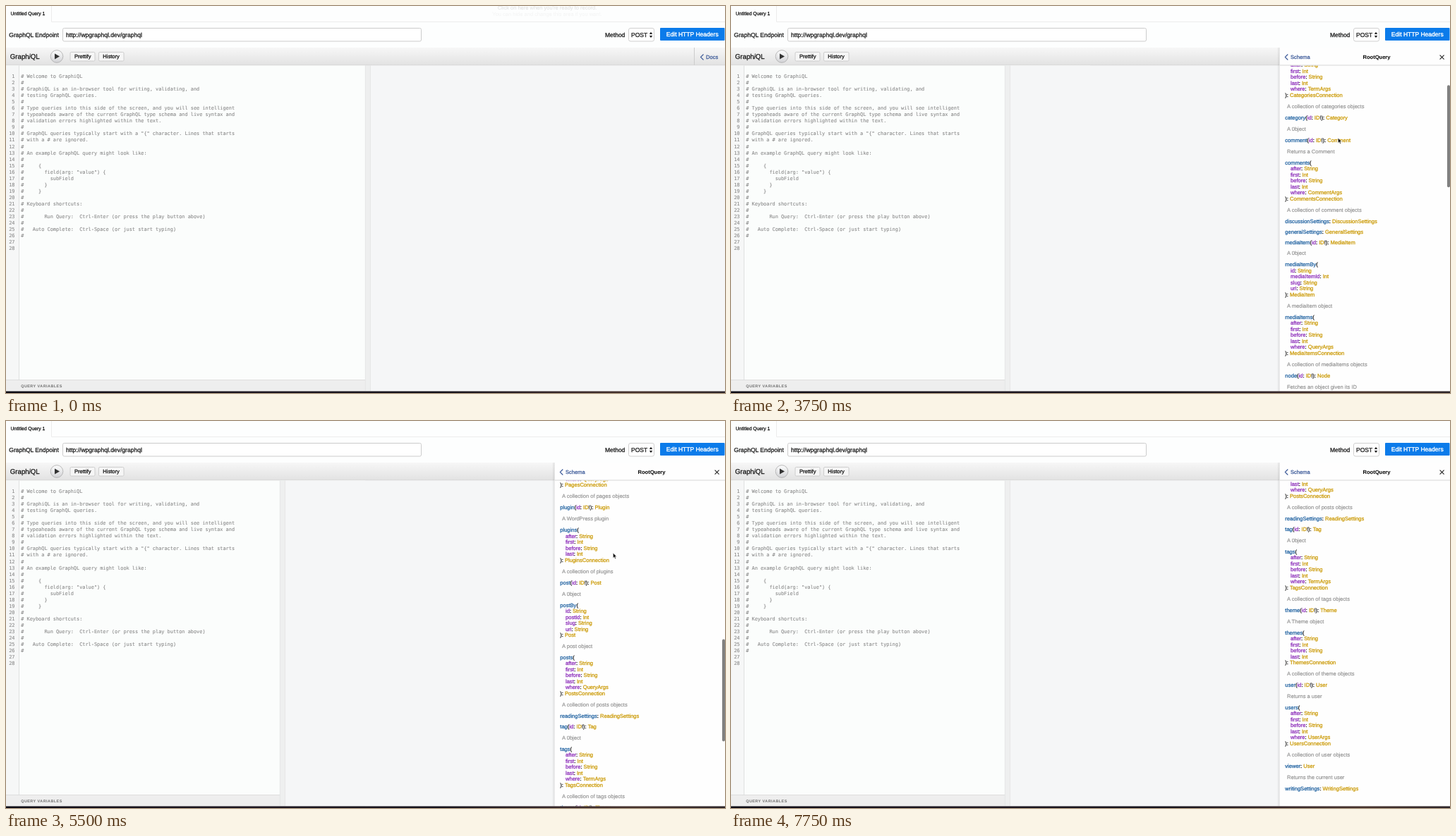
An HTML page for the animation above (8 s loop, 1019 px wide and 549 px high).

```html
<!DOCTYPE html>
<html lang="en">
<head>
<meta charset="utf-8">
<title>GraphiQL docs</title>
<style>
  html, body { margin: 0; width: 100%; height: 100%; overflow: hidden; background: #fdfefe; }
  svg { display: block; width: 100%; height: 100%; --ink: #141414; --weight: .26px; }
  text {
    font-family: "Liberation Sans", Arial, sans-serif;
    text-rendering: geometricPrecision;
    white-space: pre;
  }
  /* A hairline in the text colour gives the heavier screen rendering. */
  text, tspan { fill: var(--ink); stroke: var(--ink); stroke-width: var(--weight); }
  .mono { font-family: "DejaVu Sans Mono", monospace; --ink: #8f8f8f; --weight: .14px; }
  .caps { font-weight: bold; letter-spacing: .5px; --ink: #777; --weight: .05px; }
  .bold { font-weight: bold; --weight: .1px; }
  .field { --ink: #1f61a0; }
  .arg { --ink: #8b2bb9; }
  .type { --ink: #ca9800; }
  .keyword { --ink: #b11a04; }
  .link { --ink: #3b5998; }
  .note { --ink: #919191; --weight: .16px; }
  .white { --ink: #fff; --weight: .36px; }
  #hint { --ink: #e3e3e3; --weight: .1px; }
</style>
</head>
<body>
<svg viewBox="0 0 1019 549" preserveAspectRatio="none">
  <defs>
    <linearGradient id="bar" x2="0" y2="1">
      <stop stop-color="#f7f7f7"/><stop offset="1" stop-color="#e2e2e2"/>
    </linearGradient>
    <linearGradient id="knob" x2="0" y2="1">
      <stop stop-color="#fdfdfd"/><stop offset="1" stop-color="#d2d3d6"/>
    </linearGradient>
    <linearGradient id="shade">
      <stop stop-color="#000" stop-opacity="0"/><stop offset="1" stop-color="#000" stop-opacity=".12"/>
    </linearGradient>
    <linearGradient id="desk">
      <stop stop-color="#0d0b14"/><stop offset=".35" stop-color="#1d1620"/>
      <stop offset=".6" stop-color="#14121b"/><stop offset=".78" stop-color="#38282a"/>
      <stop offset=".88" stop-color="#46322c"/><stop offset="1" stop-color="#2c2428"/>
    </linearGradient>
    <clipPath id="docsClip"><rect x="778" y="84.5" width="241" height="462"/></clipPath>
  </defs>

  <rect width="1019" height="549" fill="#fdfefe"/>
  <path d="M64.5 0V22.5H1019" fill="none" stroke="#ececec"/>
  <g id="hint" text-anchor="middle"></g>

  <rect x="80.5" y="31.5" width="508" height="18.5" rx="2" fill="#fff" stroke="#ccc"/>
  <rect x="882.5" y="31.5" width="36" height="18.5" rx="2.5" fill="#fff" stroke="#d0d0d0"/>
  <path d="M911.8 40l2.2-3.2 2.2 3.2zM911.8 42l2.2 3.2 2.2-3.2z" fill="#222"/>
  <rect x="927" y="31" width="91.5" height="18" rx="1" fill="#0b7bea"/>

  <rect y="59" width="1019" height="25" fill="url(#bar)"/>
  <path d="M0 84H1019" stroke="#d0d0d0"/>
  <circle cx="72" cy="71.5" r="8.8" fill="url(#knob)" stroke="#aaa" stroke-width=".8"/>
  <path d="M69 67.6V75.4L76 71.5z" fill="#333"/>
  <g fill="#f6f6f6" stroke="#c4c4c4" stroke-width=".8">
    <rect x="91" y="65.5" width="35" height="12.5" rx="1.5"/>
    <rect x="131.5" y="65.5" width="35.5" height="12.5" rx="1.5"/>
  </g>
  <path d="M975.5 59V84" stroke="#ccc"/>
  <path d="M988.5 68.5L984.5 72.5 988.5 76.5" fill="none" stroke="#3b5998" stroke-width="1.1"/>
  <g id="chrome"></g>

  <rect y="84.5" width="509" height="462" fill="#fbfdfc"/>
  <rect y="84.5" width="18" height="446" fill="#f6f7f7"/>
  <path d="M18.5 84.5V530.5" stroke="#e0e0e0"/>
  <rect y="530.5" width="509" height="16" fill="#eee"/>
  <path d="M0 530.5H509" stroke="#d9d9d9" stroke-width=".8"/>
  <g id="editor"></g>

  <g id="results">
    <rect x="509" y="84.5" width="8" height="462" fill="#eeefef"/>
    <path d="M509.3 84.5V546M516.6 84.5V546" stroke="#e2e3e3" stroke-width=".7"/>
    <rect x="517" y="84.5" width="640" height="462" fill="#f5f6f7"/>
  </g>

  <g id="panel">
    <rect x="774" y="59" width="4" height="487.5" fill="url(#shade)"/>
    <rect x="777.5" y="59" width="242" height="487.5" fill="#fefefe"/>
    <g clip-path="url(#docsClip)">
      <g id="scroller">
        <circle cx="788.2" cy="95" r="2.5" fill="none" stroke="#333" stroke-width=".9"/>
        <path d="M790 97L792.6 99.6" stroke="#333" stroke-width="1.2"/>
        <path d="M785 103.5H1019M785 149.5H1019" stroke="#e2e2e2"/>
        <g id="schemaPage"></g>
        <g id="queryPage"></g>
      </g>
    </g>
    <path d="M778 84H1019" stroke="#d6d6d6"/>
    <g id="schemaHead"></g>
    <g id="queryHead">
      <path d="M789.3 68.5L785.3 72.5 789.3 76.5" fill="none" stroke="#3b5998" stroke-width="1.1"/>
    </g>
    <path d="M1004.6 69.6L1010.6 75.6M1010.6 69.6L1004.6 75.6" stroke="#222" stroke-width="1.1"/>
    <rect id="thumb" x="1015" width="4" height="145" rx="2" fill="#808080"/>
  </g>

  <rect y="546.5" width="1019" height="2.5" fill="url(#desk)"/>
  <path id="cursor" d="M0 0V7.4L1.7 5.9 2.9 8.6 4.2 8 3 5.4H5.2z" fill="#111" stroke="#fff" stroke-width=".6"/>
</svg>
<script>
const $ = id => document.getElementById(id);
const DOC = 7.55;
const LINE = 8.5, GAP = 15.95, BARE_GAP = 15;

// Text centred on y; parts are a string, or a list of strings and [string, class] pairs.
function label(parent, x, y, size, parts, attrs = {}) {
  const make = tag => document.createElementNS(parent.namespaceURI, tag);
  const node = make('text');
  Object.entries({ x, y: y + size * .36, 'font-size': size, ...attrs })
    .forEach(([key, value]) => node.setAttribute(key, value));
  for (const part of [].concat(parts)) {
    const span = make('tspan');
    const [text, cls] = typeof part === 'string' ? [part] : part;
    span.textContent = text;
    if (cls) span.setAttribute('class', cls);
    node.append(span);
  }
  parent.append(node);
}

const hint = $('hint');
label(hint, 767, 2.5, 7.5, "Click on here when you're ready to record.");
label(hint, 767, 11.5, 7.5, 'You can hide and change this area if you want.', { opacity: .35 });

const chrome = $('chrome');
label(chrome, 6.5, 10.5, 6.75, 'Untitled Query 1');
label(chrome, 4.3, 40.5, 8.5, 'GraphQL Endpoint');
label(chrome, 85, 40.8, 8.55, 'http://wpgraphql.dev/graphql');
label(chrome, 849, 40.5, 8.5, 'Method');
label(chrome, 886, 40.8, 8.5, 'POST');
label(chrome, 935.8, 40.3, 8.55, 'Edit HTTP Headers', { class: 'white' });
label(chrome, 5.8, 71.8, 9.7, 'Graph');
label(chrome, 32.6, 71.8, 9.7, 'i', { 'font-style': 'italic' });
label(chrome, 34.8, 71.8, 9.7, 'QL');
label(chrome, 97, 71.5, DOC, 'Prettify');
label(chrome, 137.3, 71.5, DOC, 'History');
label(chrome, 992, 72.5, DOC, 'Docs', { class: 'link' });

const code = `# Welcome to GraphiQL
#
# GraphiQL is an in-browser tool for writing, validating, and
# testing GraphQL queries.
#
# Type queries into this side of the screen, and you will see intelligent
# typeaheads aware of the current GraphQL type schema and live syntax and
# validation errors highlighted within the text.
#
# GraphQL queries typically start with a "{" character. Lines that starts
# with a # are ignored.
#
# An example GraphQL query might look like:
#
#     {
#       field(arg: "value") {
#         subField
#       }
#     }
#
# Keyboard shortcuts:
#
#       Run Query:  Ctrl-Enter (or press the play button above)
#
#   Auto Complete:  Ctrl-Space (or just start typing)
#

`.split('\n');
code.forEach((line, i) => {
  const y = 99.6 + i * 9.04;
  label($('editor'), 12.5, y, 6.9, String(i + 1), { class: 'mono', 'text-anchor': 'end' });
  if (line) label($('editor'), 21.2, y, 6.9, line, { class: 'mono' });
});
label($('editor'), 21.2, 538.8, 5.4, 'QUERY VARIABLES', { class: 'caps' });

function pageTop(page, search, intro, heading) {
  label(page, 796, 95, DOC, search, { class: 'note' });
  label(page, 785.3, 114.3, DOC, intro);
  label(page, 785.3, 140, 5.4, heading, { class: 'caps' });
}

const schemaPage = $('schemaPage');
pageTop(schemaPage, 'Search Schema...', 'A GraphQL schema provides a root type for each kind of operation.', 'ROOT TYPES');
label(schemaPage, 785.3, 160, DOC, [['query', 'keyword'], ': ', ['RootQuery', 'type']]);
label(schemaPage, 785.3, 175, DOC, [['mutation', 'keyword'], ': ', ['RootMutation', 'type']]);
label($('schemaHead'), 915, 72.5, DOC, 'Documentation Explorer', { class: 'bold', 'text-anchor': 'middle' });

const queryPage = $('queryPage');
pageTop(queryPage, 'Search RootQuery...', 'No Description', 'FIELDS');
label($('queryHead'), 793, 72.5, DOC, 'Schema', { class: 'link' });
label($('queryHead'), 915, 72.5, DOC, 'RootQuery', { class: 'bold', 'text-anchor': 'middle' });

const paging = 'after:String first:Int before:String last:Int';
const paged = where => `${paging} where:${where}`;
// name, arguments, type, description
const fields = [
  ['categories', paged('TermArgs'), 'CategoriesConnection', 'A collection of categories objects'],
  ['category', 'id:ID!', 'Category', 'A 0bject'],
  ['comment', 'id:ID!', 'Comment', 'Returns a Comment'],
  ['comments', paged('CommentArgs'), 'CommentsConnection', 'A collection of comment objects'],
  ['discussionSettings', '', 'DiscussionSettings'],
  ['generalSettings', '', 'GeneralSettings'],
  ['mediaItem', 'id:ID!', 'MediaItem', 'A 0bject'],
  ['mediaItemBy', 'id:String mediaItemId:Int slug:String uri:String', 'MediaItem', 'A mediaItem object'],
  ['mediaItems', paged('QueryArgs'), 'MediaItemsConnection', 'A collection of mediaItems objects'],
  ['node', 'id:ID!', 'Node', 'Fetches an object given its ID'],
  ['page', 'id:ID!', 'Page', 'A 0bject'],
  ['pageBy', 'id:String pageId:Int uri:String', 'Page', 'A page object'],
  ['pages', paged('QueryArgs'), 'PagesConnection', 'A collection of pages objects'],
  ['plugin', 'id:ID!', 'Plugin', 'A WordPress plugin'],
  ['plugins', paging, 'PluginsConnection', 'A collection of plugins'],
  ['post', 'id:ID!', 'Post', 'A 0bject'],
  ['postBy', 'id:String postId:Int slug:String uri:String', 'Post', 'A post object'],
  ['posts', paged('QueryArgs'), 'PostsConnection', 'A collection of posts objects'],
  ['readingSettings', '', 'ReadingSettings'],
  ['tag', 'id:ID!', 'Tag', 'A 0bject'],
  ['tags', paged('TermArgs'), 'TagsConnection', 'A collection of tags objects'],
  ['theme', 'id:ID!', 'Theme', 'A Theme object'],
  ['themes', paging, 'ThemesConnection', 'A collection of theme objects'],
  ['user', 'id:ID!', 'User', 'Returns a user'],
  ['users', paged('UserArgs'), 'UsersConnection', 'A collection of user objects'],
  ['viewer', '', 'User', 'Returns the current user'],
  ['writingSettings', '', 'WritingSettings'],
];

function argument(text) {
  const [name, type] = text.split(':');
  const parts = [[name, 'arg'], ': ', [type.replace('!', ''), 'type']];
  return type.endsWith('!') ? [...parts, '!'] : parts;
}

let y = 160.2;
for (const [name, argText, type, note] of fields) {
  const args = argText.split(' ').filter(Boolean).map(argument);
  const head = [name, 'field'], tail = [type, 'type'];
  const row = (x, parts) => label(queryPage, x, y, DOC, parts);
  if (args.length > 1) {
    row(785.3, [head, '(']);
    for (const arg of args) { y += LINE; row(793, arg); }
    y += LINE;
    row(785.3, ['): ', tail]);
  } else if (args.length) {
    row(785.3, [head, '(', ...args[0], '): ', tail]);
  } else {
    row(785.3, [head, ': ', tail]);
  }
  if (note) {
    y += GAP;
    label(queryPage, 788, y, DOC, note, { class: 'note' });
  }
  y += note ? GAP : BARE_GAP;
}

const STEP = 250, LOOP = 8000;
const SCROLL_START = 13;
const scrolls = [8, 40, 85, 152, 226, 305, 386, 485, 592, 699, 795, 880, 945, 979];
// [step, x, y]; each position holds until the next one
const cursorStops = [
  [3, 800, 250], [4, 930, 125], [5, 997, 71], [7, 955, 95], [8, 880, 140],
  [9, 835.8, 159.8], [13, 850, 176], [14, 860.3, 187], [29, 862, 120],
];
const CURSOR_GONE = 30;

const show = (id, on) => $(id).setAttribute('visibility', on ? 'inherit' : 'hidden');
const move = (id, dx, dy) => $(id).setAttribute('transform', `translate(${dx} ${dy})`);

function draw(step) {
  const open = step >= 6, root = step >= 11;
  const index = Math.min(step - SCROLL_START, scrolls.length - 1);
  const scroll = index < 0 ? 0 : scrolls[index];
  hint.setAttribute('opacity', [1, .5][step] || 0);
  move('results', open ? -121 : 0, 0);
  show('panel', open);
  for (const part of ['Page', 'Head']) {
    show('schema' + part, !root);
    show('query' + part, root);
  }
  move('scroller', 0, -scroll);
  move('thumb', 0, 85 + scroll * .321);
  show('thumb', step >= SCROLL_START && step < 27);
  const stop = cursorStops.filter(([at]) => at <= step).pop();
  show('cursor', stop && step < CURSOR_GONE);
  if (stop) move('cursor', stop[1], stop[2]);
}

const start = performance.now();
let shown = -1;
function tick() {
  const step = Math.floor((performance.now() - start) % LOOP / STEP);
  if (step !== shown) draw(shown = step);
  requestAnimationFrame(tick);
}
tick();
</script>
</body>
</html>
```
